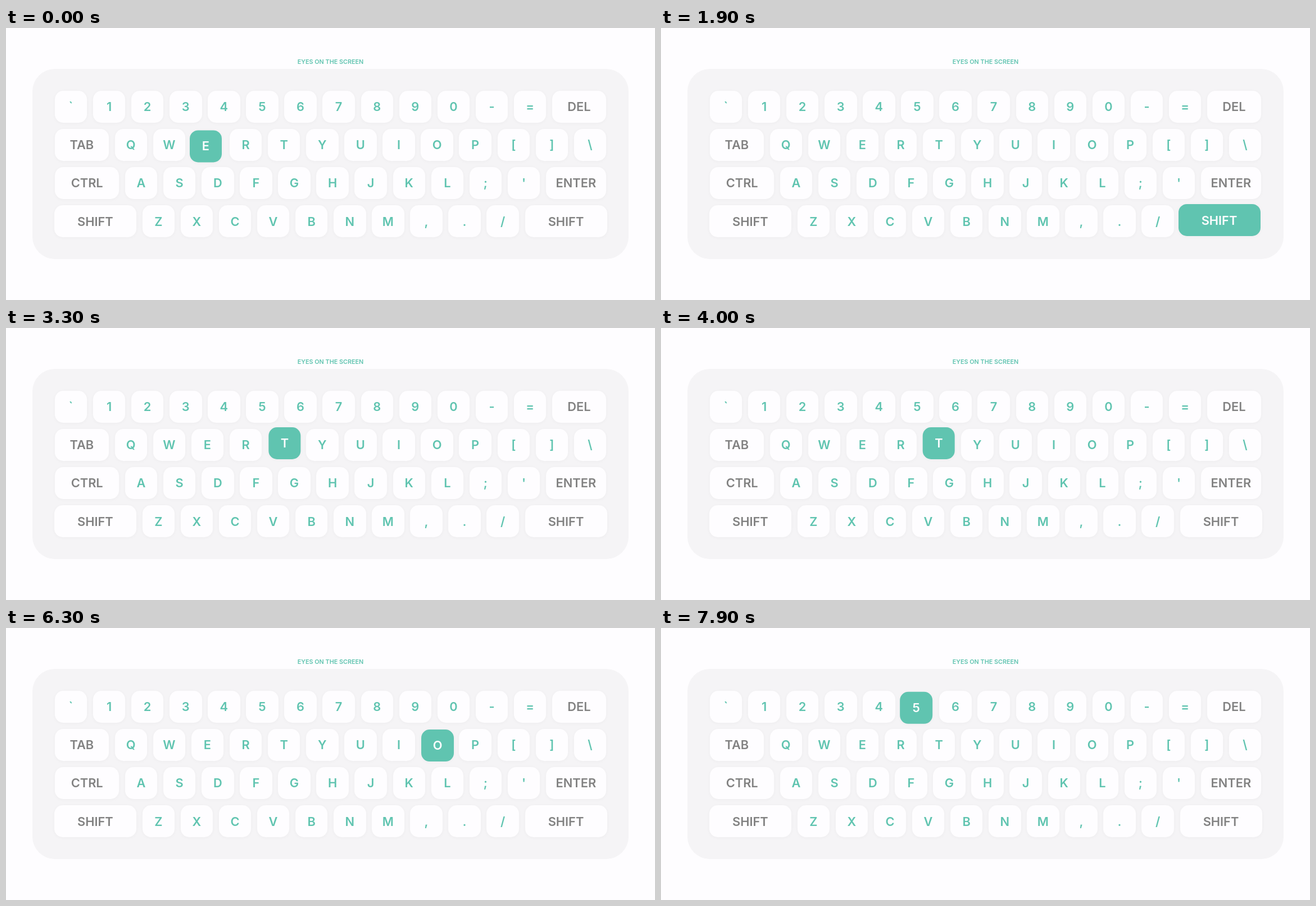
Write an HTML page that moves like this. It is 1155 px wide and 485 px high and loops after 8 s.

```html
<!DOCTYPE html>
<html lang="en">
<head>
<meta charset="utf-8">
<title>Keyboard</title>
<style>
  :root { --teal: #60c4b0; --paper: #fefdff; }
  html, body {
    margin: 0;
    width: 100%;
    height: 100%;
    overflow: hidden;
    background: var(--paper);
  }
  body {
    position: relative;
    font-family: Inter, Roboto, sans-serif;
    font-weight: 600;
    font-optical-sizing: none;
  }
  h1 {
    position: absolute;
    left: 0;
    top: 54px;
    width: 1155px;
    margin: 0;
    font-size: 10.8px;
    font-weight: 600;
    line-height: 14px;
    text-align: center;
    color: var(--teal);
  }
  .board {
    position: absolute;
    left: 47px;
    top: 72.5px;
    width: 1061px;
    height: 339.5px;
    border-radius: 40px;
    background: #f5f4f6;
  }
  .key {
    position: absolute;
    height: 57.5px;
    display: flex;
    align-items: center;
    justify-content: center;
    border-radius: 15px;
    font-size: 21.8px;
    color: var(--teal);
    background: var(--paper);
    box-shadow: 0 1px 6px rgba(0, 0, 0, .035);
  }
  .wide { color: #828282; }
  .active { color: var(--paper); background: var(--teal); z-index: 1; }
</style>
</head>
<body>
<h1>EYES ON THE SCREEN</h1>
<div class="board"></div>
<script>
const LOOP = 8000, STEP = 100, SHAKE = 510, AMP = 3;
const KEY = 57.5, GAP = 10.6, TOP = 111.5;

const rows = [
  { x: 86.7, keys: "` 1 2 3 4 5 6 7 8 9 0 - = DEL:96" },
  { x: 86.9, keys: "TAB:96 Q W E R T Y U I O P [ ] \\" },
  { x: 87.2, keys: "CTRL:114 A S D F G H J K L ; ' ENTER:107" },
  { x: 85.9, keys: "SHIFT:146 Z X C V B N M , . / SHIFT:146" }
];

// Corner signs visited during one shake, evenly spaced in time.
const path = [[0, 0], [-1, -1], [1, -1], [-1, 1], [1, 1], [-1, -1],
              [1, -1], [-1, 1], [-1, -1], [1, -1], [0, 0]];

// Key, time it lights up, shake phase at that moment.
const presses = [
  ["E", 0, 0.71],
  ["SHIFT", 1500, 0],
  ["2", 2474, 0],
  ["T", 3212, 0],
  ["4", 4095, 0],
  ["S", 5250, 0],
  ["O", 6250, 0.335],
  ["CTRL", 6600, 0],
  ["5", 7043, 0]
];

// A repeated label resolves to its last key, the right-hand one.
const keys = {};
rows.forEach((row, r) => {
  let x = row.x;
  for (const item of row.keys.split(" ")) {
    const [label, size] = item.split(":");
    const width = Number(size) || KEY;
    const el = document.createElement("div");
    el.className = size ? "key wide" : "key";
    el.textContent = label;
    el.style.left = x + "px";
    el.style.top = TOP + r * (KEY + GAP) + "px";
    el.style.width = width + "px";
    document.body.append(el);
    keys[label] = el;
    x += width + GAP;
  }
});

function shake(phase) {
  const p = (phase % 1) * (path.length - 1);
  const i = Math.floor(p);
  return path[i].map((v, axis) => AMP * (v + (path[i + 1][axis] - v) * (p - i)));
}

let current = null;

function draw(now) {
  const t = Math.floor((now % LOOP) / STEP) * STEP;
  const [label, start, phase] = presses.filter(p => p[1] <= t).pop();
  const el = keys[label];
  if (el !== current) {
    if (current) {
      current.classList.remove("active");
      current.style.transform = "";
    }
    el.classList.add("active");
    current = el;
  }
  const [dx, dy] = shake(phase + (t - start) / SHAKE);
  el.style.transform = `translate(${dx.toFixed(2)}px, ${dy.toFixed(2)}px)`;
}

const origin = performance.now();
function tick() {
  draw(performance.now() - origin);
  requestAnimationFrame(tick);
}
tick();
</script>
</body>
</html>
```
